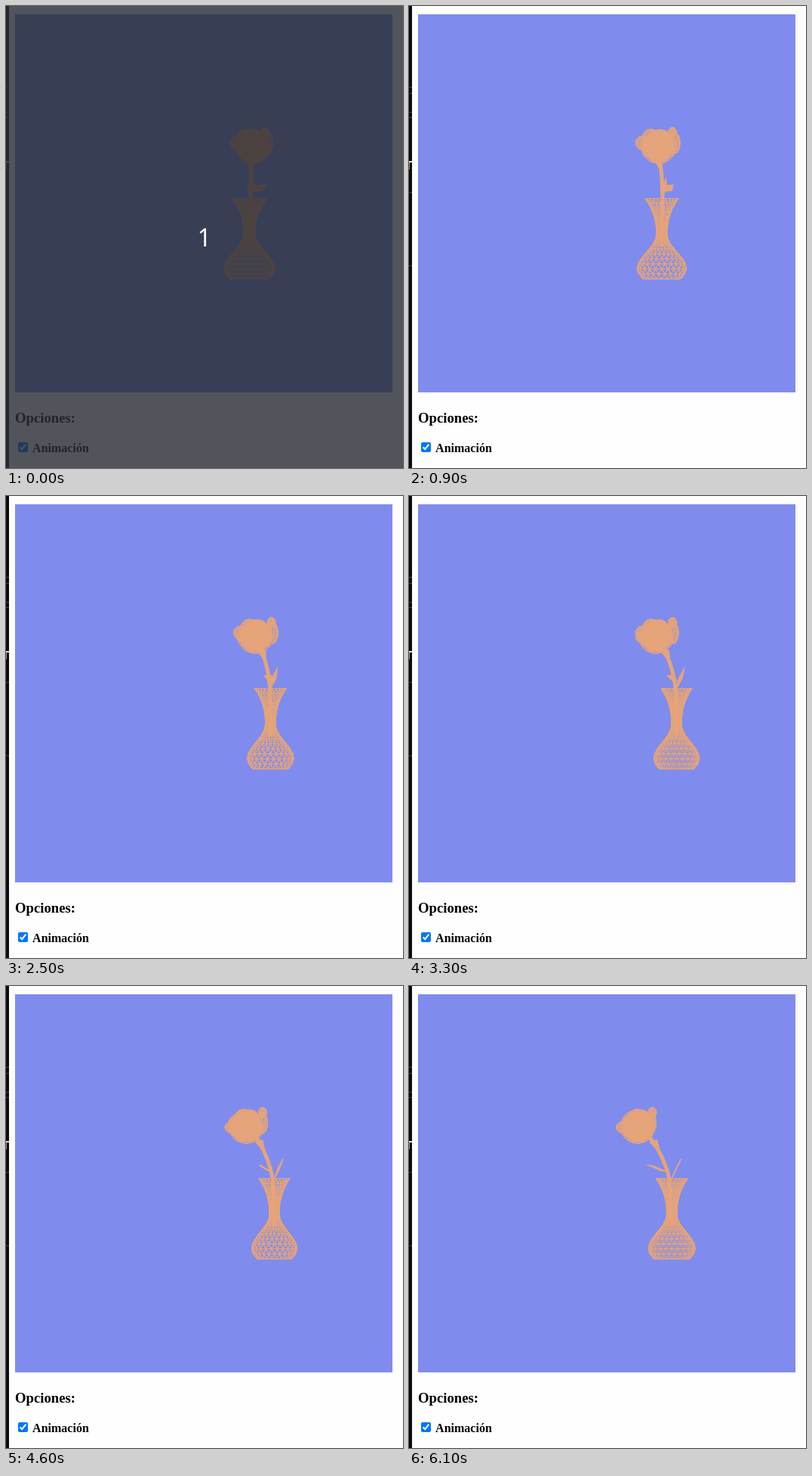
An HTML page with a canvas for the animation above (6.3 s loop, 526 by 611 pixels).

```html
<!DOCTYPE html>
<html lang="es">
<head>
<meta charset="utf-8">
<title>Opciones</title>
<style>
  html, body { margin: 0; width: 100%; height: 100%; overflow: hidden; background: #fefefe; }
  canvas { display: block; }
  h3, p { position: absolute; left: 12px; margin: 0; color: #000; white-space: nowrap;
          font-family: "Liberation Serif", serif; font-weight: bold; }
  h3 { top: 534px; font-size: 18.72px; }
  p { top: 574px; font-size: 16px; }
  input { margin: 3px 3px 3px 4px; pointer-events: none; }
  #countdown { position: absolute; inset: 0; background: rgba(41, 45, 52, .81); color: #fff;
               font: 32px/611px "Noto Sans", "Open Sans", sans-serif; text-align: center; }
  #countdown span { position: absolute; left: 0; width: 526px; top: 0; }
</style>
</head>
<body>
<canvas id="stage" width="526" height="611"></canvas>
<h3>Opciones:</h3>
<p><input type="checkbox" checked tabindex="-1"> Animación</p>
<div id="countdown"><span>1</span></div>
<script>
const ctx = document.getElementById('stage').getContext('2d');
const countdown = document.getElementById('countdown');
const LOOP = 6300, STEP = 100, LAST = 6100;
const AXIS = 262, MESH = '#e5a47a', TAU = Math.PI * 2;

let angle = 0;
// Orthographic projection of a point turning about the vertical axis.
const turn = (a, b) => AXIS + a * Math.cos(angle) + b * Math.sin(angle);

const VASE = { a: 94, ra: 30.2, rb: 36.3, top: 254.5, bottom: 361, rings: 17, sides: 24 };
const FLOWER = { a: 60, b: -35 };
// Overlapping petals: place around the flower centre, height, radii.
const PETALS = [
  { a: 0, b: 0, y: 186, rx: 23, ry: 22, solid: true },
  { a: 5, b: 0, y: 175, rx: 12, ry: 11, solid: true },
  { a: -5, b: 10, y: 174, rx: 11, ry: 11 },
  { a: 22, b: -2, y: 167, rx: 5.5, ry: 6 },
  { a: 22, b: -7, y: 181, rx: 7, ry: 14 },
  { a: -15, b: 14, y: 181, rx: 10, ry: 9 },
  { a: -19, b: -6, y: 187, rx: 9, ry: 7 }
];

const smooth = u => { u = Math.min(1, Math.max(0, u)); return u * u * (3 - 2 * u); };

// Relative vase radius: flared lip, narrow neck, round bowl.
function vaseRadius(y) {
  const lip = .47 * Math.max(0, (300 - y) / 46) ** 2.2;
  const bowl = .78 * smooth((y - 303) / 44);
  const foot = .24 * Math.max(0, (y - 347) / 14) ** 2;
  return .22 + lip + bowl - foot;
}

function fillPolygon(points) {
  ctx.beginPath();
  points.forEach(([x, y]) => ctx.lineTo(x, y));
  ctx.closePath();
  ctx.fill();
}

function drawVase() {
  const { a, ra, rb, top, bottom, rings, sides } = VASE;
  const vertex = (row, i) => {
    const y = top + (bottom - top) * row / (rings - 1);
    const phi = (i + row / 2) / sides * TAU, r = vaseRadius(y);
    return [turn(a + ra * r * Math.cos(phi), rb * r * Math.sin(phi)), y];
  };
  ctx.lineWidth = 1;
  ctx.beginPath();
  for (let row = 0; row < rings; row++) {
    for (let i = 0; i < sides; i++) {
      const ends = [vertex(row, i + 1)];
      if (row < rings - 1) ends.push(vertex(row + 1, i), vertex(row + 1, i - 1));
      ends.forEach(end => {
        ctx.moveTo(...vertex(row, i));
        ctx.lineTo(...end);
      });
    }
  }
  ctx.stroke();
}

function drawStem() {
  const neck = turn(76.5, -18.6);
  ctx.lineWidth = 5;
  ctx.beginPath();
  ctx.moveTo(turn(94, 0), 318);
  ctx.lineTo(turn(92, -4), 254);
  ctx.quadraticCurveTo(turn(88, -9), 230, neck, 208);
  ctx.lineTo(turn(72, -23), 200);
  ctx.stroke();
  fillPolygon([[turn(84, -12), 222], [neck - 7, 206], [neck + 4, 203]]);
}

// A leaf is a diamond: base, tip and a sideways offset, each as [a, b, y].
function drawLeaf(base, tip, side) {
  const mid = base.map((v, i) => (v + tip[i]) / 2);
  const edge = k => mid.map((v, i) => v + k * side[i]);
  fillPolygon([base, edge(1), tip, edge(-1)].map(([a, b, y]) => [turn(a, b), y]));
  ctx.lineWidth = 1.6;
  ctx.stroke();
}

// An ellipsoid of meridians and parallels, with a solid core if asked for.
function drawPetal({ a, b, y, rx, ry, solid }) {
  const x = turn(FLOWER.a + a, FLOWER.b + b);
  const oval = (cy, w, h) => {
    ctx.moveTo(x + w, cy);
    ctx.ellipse(x, cy, w, h, 0, 0, TAU);
  };
  if (solid) {
    ctx.beginPath();
    oval(y, rx * .92, ry * .92);
    ctx.fill();
  }
  ctx.lineWidth = 1;
  ctx.beginPath();
  for (let k = 0; k < 6; k++) {
    oval(y, rx * Math.abs(Math.cos(k * Math.PI / 6 + angle)), ry);
    const tilt = (k - 2.5) / 3;
    oval(y + ry * tilt, rx * Math.sqrt(1 - tilt * tilt), 1.2);
  }
  oval(y, rx, ry);
  ctx.stroke();
}

function rect(color, x, y, w, h) {
  ctx.fillStyle = color;
  ctx.fillRect(x, y, w, h);
}

function drawPage() {
  rect('#fefefe', 0, 0, 526, 611);
  rect('#0b0b0f', 0, 0, 4, 611);
  [107, 115, 140, 147, 246, 343].forEach(y => rect('#444', 0, y, 4, 1));
  rect('#ddd', 0, 205, 4, 2);
  rect('#b98a6c', 0, 207, 1, 9);
  rect('#7f8cee', 12, 11, 500, 500);
}

function render(now) {
  const t = Math.min(LAST, Math.floor((now % LOOP) / STEP) * STEP);
  angle = .00021 * (t - 4150);
  drawPage();
  ctx.fillStyle = ctx.strokeStyle = MESH;
  drawVase();
  drawStem();
  drawLeaf([88, -8, 245], [79, -42, 237], [6, -1.5, 3]);
  drawLeaf([94.5, 0, 253], [105, 5, 229], [-1.5, 4, 0]);
  PETALS.forEach(drawPetal);
  countdown.hidden = t >= STEP;
}

const start = performance.now();
function loop() {
  render(performance.now() - start);
  requestAnimationFrame(loop);
}
loop();
</script>
</body>
</html>
```
